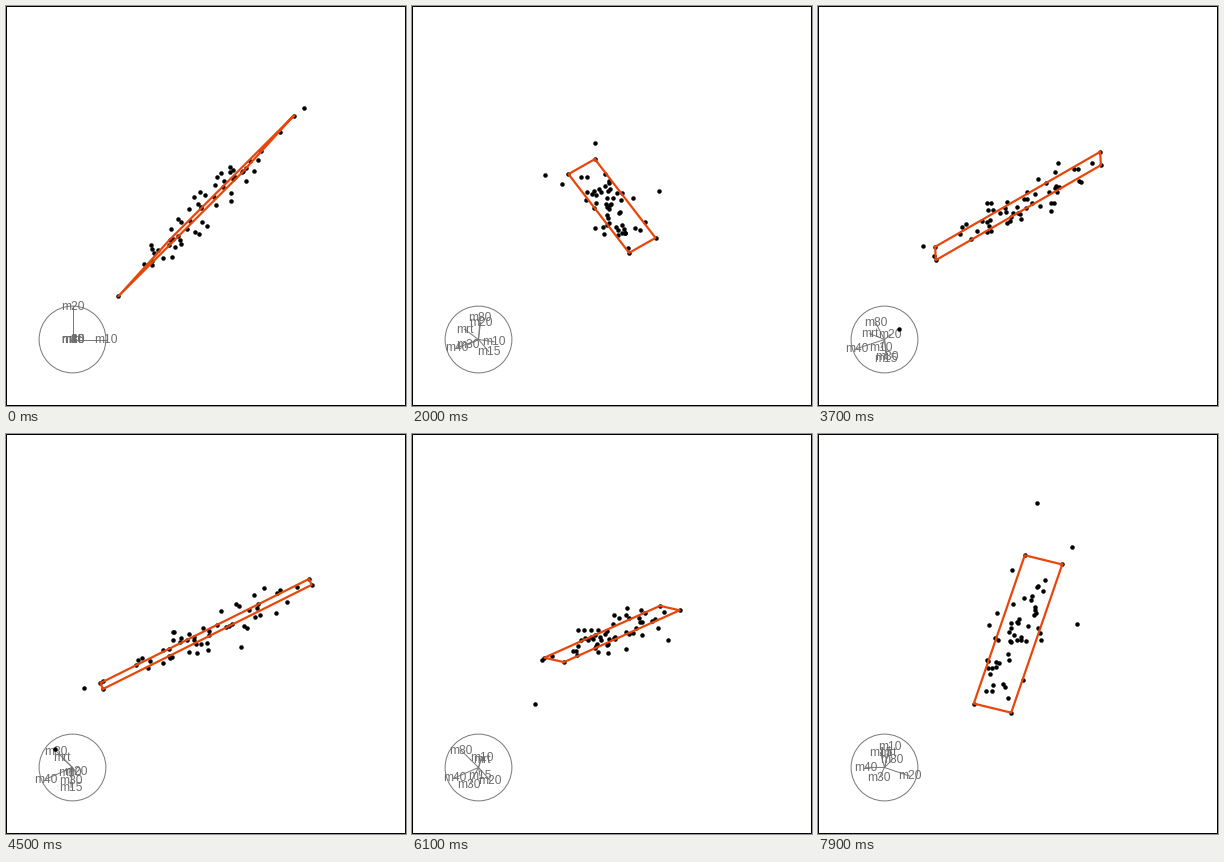
These frames come from a looping animation (400 by 400 pixels, 8000 ms). A matplotlib script:

```python
import numpy as np
import matplotlib.pyplot as plt
from matplotlib.animation import FuncAnimation

FRAMES, STEP = 80, 100
PX = 0.72  # points per pixel at 100 dpi
HUB, RADIUS = np.array([66.5, 333.5]), 33.4
GREY, ORANGE = "#7a7a7a", "#e8450a"
FLIP = np.array([1, -1])

# Where the tip of each variable's axis passes at the key times
TIMES = np.array([0, 20, 37, 54, 70, 79])
TIPS = {
    "m10": [1, .48 - .07j, -.10 - .25j, .02 + .07j, .13 + .52j, .16 + .63j],
    "m20": [1j, .06 + .51j, .17 + .15j, .07 - .39j, .73 - .27j, .76 - .25j],
    "m40": [0, -.65 - .25j, -.83 - .28j, -.73 - .39j, -.59 - .06j, -.57],
    "m80": [0, .05 + .66j, -.26 + .51j, -.64 + .49j, -.17 + .43j, .24 + .24j],
    "m15": [0, .31 - .36j, .05 - .58j, -.08 - .51j, .16 + .19j, -.12 + .45j],
    "m30": [0, -.32 - .16j, .08 - .52j, -.23 - .27j, -.20 - .66j, -.16 - .31j],
    "mrt": [0, -.43 + .31j, -.44 + .18j, -.10 + .40j, .22 + .07j, .12 + .45j],
}
KEYS = np.array(list(TIPS.values())).T
SLOPES = np.gradient(KEYS, TIMES, axis=0)


def projection(frame):
    """Hermite path through the key tips, kept orthonormal."""
    i = min(np.searchsorted(TIMES, frame, side="right") - 1, len(TIMES) - 2)
    span = TIMES[i + 1] - TIMES[i]
    u = (frame - TIMES[i]) / span
    ease = u * u * (3 - 2 * u)
    mix = (KEYS[i] * (1 - ease) + KEYS[i + 1] * ease
           + span * u * (1 - u) * ((1 - u) * SLOPES[i] - u * SLOPES[i + 1]))
    left, _, right = np.linalg.svd(np.column_stack([mix.real, mix.imag]),
                                   full_matrices=False)
    return left @ right


def ordinary_rows(count=50):
    """Two sprints that agree; each longer distance follows the one before."""
    rng = np.random.default_rng(4)

    def noise(spread):
        return spread * np.clip(rng.normal(size=count), -1.7, 1.7)

    last = np.linspace(-58, 46, count) + noise(3)
    gap = noise(6)
    cols = [last + gap, last - gap]
    for gain, spread in [(.82, 14), (.86, 13), (.88, 10), (.96, 6), (.85, 12)]:
        last = gain * last + noise(spread) - 1
        cols.append(last)
    return np.column_stack(cols)


# Far-out rows, each by its level in sprints, middle and long distances
extremes = np.repeat([[98, 78, 54], [74, 72, 148], [27, 59, 68],
                      [55, -25, -7]], [2, 2, 3], axis=1)

# The box spans overall level and the contrast of sprints with long distances
level = np.full(7, 124)
contrast = 105 * np.array([.49, .54, .25, -.16, -.36, -.35, -.37])
corners = np.array([level + contrast, level - contrast,
                    -level - contrast, contrast - level]) / 2
ROWS = np.vstack([ordinary_rows(), extremes, corners])

fig = plt.figure(figsize=(4, 4), dpi=100, facecolor="white")
ax = fig.add_axes([0, 0, 1, 1])
ax.set(xlim=(0, 400), ylim=(400, 0))
ax.axis("off")
ax.add_patch(plt.Rectangle((.5, .5), 399, 399, fill=False, ec="black",
                           lw=PX, snap=False))
ax.add_patch(plt.Circle(HUB, RADIUS, fill=False, ec=GREY, lw=PX))

spokes = [ax.plot([], [], color=GREY, lw=PX)[0] for _ in TIPS]
labels = [ax.text(0, 0, name, color="#6e6e6e", fontsize=12 * PX,
                  family="Liberation Sans", ha="center", va="center")
          for name in TIPS]
dots, = ax.plot([], [], "o", color="black", ms=4.5 * PX, mew=0, zorder=4)
box, = ax.plot([], [], color=ORANGE, lw=2.2 * PX, zorder=5,
               solid_joinstyle="round")


def draw(frame):
    basis = projection(frame)
    spots = 200 + ROWS @ basis * FLIP
    dots.set_data(*spots.T)
    box.set_data(*spots[[-4, -3, -2, -1, -4]].T)
    for spoke, label, tip in zip(spokes, labels, HUB + RADIUS * basis * FLIP):
        spoke.set_data(*np.array([HUB, tip]).T)
        label.set_position(tip + [0, .5])
    return [dots, box, *spokes, *labels]


anim = FuncAnimation(fig, draw, frames=FRAMES, interval=STEP,
                     repeat=True, repeat_delay=0)
plt.show()
```
